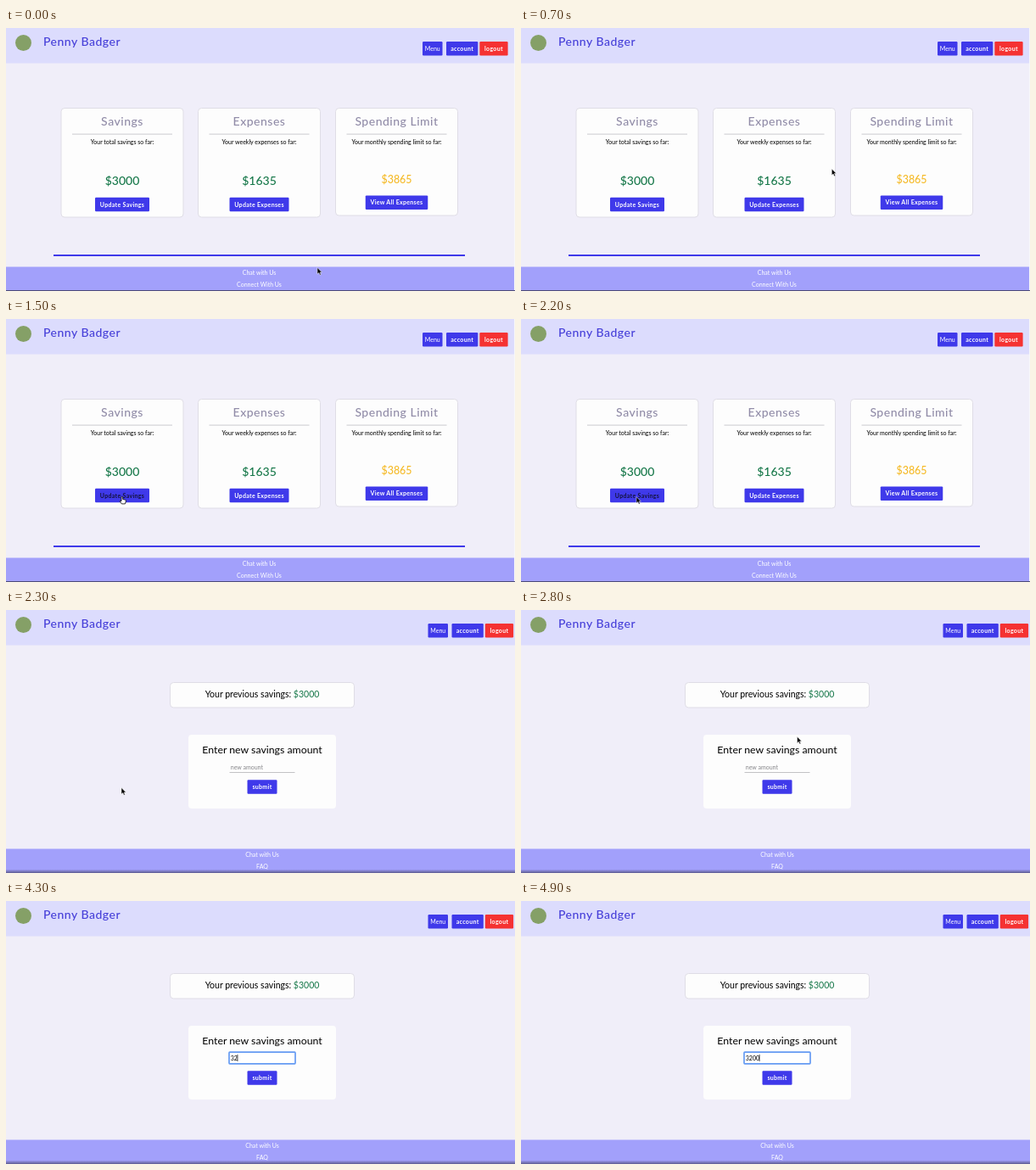
Animation of 600x310 px, one loop 5 s. Source, as an HTML page:

```html
<!DOCTYPE html>
<html lang="en">
<head>
<meta charset="utf-8">
<title>Savings update</title>
<style>
  html, body { margin: 0; width: 100%; height: 100%; overflow: hidden; background: #f0eef9; }
  svg { display: block; width: 600px; height: 310px; font: 7px Lato, sans-serif; }
  .head { font-size: 14px; font-weight: 500; letter-spacing: .5px; }
  .btn { font-weight: 700; letter-spacing: .32px; fill: #fff; }
  .card { fill: #fdfdfd; stroke: #dfdde6; }
</style>
</head>
<body>
<svg viewBox="0 0 600 310">
  <defs>
    <linearGradient id="shade" x2="0" y2="1">
      <stop offset="0" stop-color="#a2a0fb"/>
      <stop offset="1" stop-color="#5c5b90"/>
    </linearGradient>
  </defs>
  <rect width="600" height="310" fill="#f0eef9"/>
  <rect width="600" height="41.5" fill="#dcdcfd"/>
  <circle cx="20.5" cy="17.5" r="9.5" fill="#85a067"/>
  <text class="head" x="44" y="20.5" fill="#463fd9">Penny Badger</text>
  <rect y="281.5" width="600" height="28.5" fill="#a2a0fb"/>
  <g id="nav"></g>
  <g id="home"></g>
  <g id="form"></g>
  <g id="pointer">
    <path id="arrow" d="M0 0V7.6L1.8 6 3 8.7 4.3 8.1 3.1 5.5H5.4Z" fill="#000" stroke="#fff" stroke-width=".5"/>
    <path id="hand" d="M0 0Q1-.9 1.7 0V3L4.7 3.6Q5.6 4 5.3 5.6L4.4 8.4H.4L-1.9 5.2Q-1.6 4.2 0 5.2Z" fill="#fff" stroke="#000" stroke-width=".8"/>
    <path id="beam" d="M-1.3-3.8Q0-3.8 0-2.8Q0-3.8 1.3-3.8M0-2.8V3M-1.3 4Q0 4 0 3Q0 4 1.3 4" fill="none" stroke="#222" stroke-width=".9"/>
  </g>
</svg>
<script>
const $ = id => document.getElementById(id);
const BLUE = '#3f39ea', GREEN = '#17784a';

const text = (s, x, y, attrs = '') =>
  `<text x="${x}" y="${y}" text-anchor="middle" ${attrs}>${s}</text>`;
const box = (x, y, w, h, attrs) =>
  `<rect x="${x}" y="${y}" width="${w}" height="${h}" ${attrs}/>`;
const button = (s, x, y, w, fill = BLUE, attrs = 'class="btn"') =>
  box(x, y, w, 16.5, `rx="1.2" fill="${fill}"`) + text(s, x + w / 2, y + 10.8, attrs);
const footer = (x, last) =>
  text('Chat with Us', x, 291, 'fill="#fff"') + text(last, x, 305, 'fill="#fff"');

function card(x, h, title, label, amount, size, color, action, btnW, btnY, id) {
  const mid = x + 72;
  return box(x, 94.5, 144, h, 'rx="4" class="card"') +
    text(title, mid, 115, 'class="head" fill="#918ca8"') +
    box(x + 13, 124.6, 118, 1, 'fill="#cbcad0"') +
    text(label, mid, 136.8) +
    text(amount, mid, 179.5 + size * .36 - (size < 14 ? 1 : 0), `font-size="${size}" font-weight="500" fill="${color}"`) +
    button(action, mid - btnW / 2, btnY, btnW, BLUE, `class="btn" id="${id}"`);
}

$('nav').innerHTML =
  button('Menu', 491, 16, 23.5, BLUE, 'fill="#fff"') +
  button('account', 519, 16, 37.3) +
  button('logout', 558.3, 16, 33.3, '#f53232');

$('home').innerHTML =
  card(65, 128.5, 'Savings', 'Your total savings so far:', '$3000', 14, GREEN, 'Update Savings', 64, 199.8, 'update') +
  card(226.5, 128.5, 'Expenses', 'Your weekly expenses so far:', '$1635', 14, GREEN, 'Update Expenses', 70, 199.8, 'expenses') +
  card(388.5, 126.5, 'Spending Limit', 'Your monthly spending limit so far:', '$3865', 12.4, '#f5ba27', 'View All Expenses', 73.5, 197.4, 'all') +
  box(56, 267, 485, 2, `fill="${BLUE}"`) +
  footer(298.5, 'Connect With Us') +
  box(0, 309, 600, 1, 'fill="#4c4a78"') +
  box(599, 0, 1, 309, 'fill="#f7f7fa"');

$('form').innerHTML =
  box(193.5, 85.5, 217, 29.5, 'rx="4" class="card"') +
  text(`Your previous savings: <tspan fill="${GREEN}">$3000</tspan>`, 302, 102.7, 'font-size="10.5"') +
  box(215, 147, 174, 87, 'rx="4" fill="#fdfdfd"') +
  text('Enter new savings amount', 302, 168.5, 'font-size="12.3"') +
  box(263.5, 191, 77, .8, 'fill="#b5b5b8"') +
  box(263, 178.2, 78, 13.6, 'id="ring" rx=".8" fill="#fff" stroke="#659bf3" stroke-width="1.7"') +
  '<text id="entry" x="264.8" y="187.6"></text>' +
  box(0, 181, .8, 8, 'id="caret" fill="#111"') +
  button('submit', 284.5, 200.2, 35) +
  footer(302, 'FAQ') +
  box(0, 305.5, 600, 4.5, 'fill="url(#shade)"');

// Pointer stops: time, x, y
const stops = [[0, 367, 282.5], [200, 367, 282.5], [700, 366.3, 166], [800, 366.3, 166],
  [1400, 136, 209.5], [2300, 136, 209.5], [2800, 325.5, 149.3], [2900, 325.5, 149.3], [3300, 286, 188]];
const LOAD = 2300, FOCUS = 3500, TYPE = 4100, KEY = 200;

function pointerAt(t) {
  const i = stops.findIndex(s => s[0] > t);
  if (i < 0) return stops.at(-1).slice(1);
  const [t0, x0, y0] = stops[i - 1], [t1, x1, y1] = stops[i];
  const p = (t - t0) / (t1 - t0), e = p * p * (3 - 2 * p);
  return [x0 + (x1 - x0) * e, y0 + (y1 - y0) * e];
}

const show = (id, on) => $(id).style.display = on ? '' : 'none';

function draw(t) {
  const loaded = t >= LOAD, focused = t >= FOCUS, typing = t >= TYPE;
  const [x, y] = pointerAt(t);
  const over = !loaded && x > 105 && x < 169 && y > 200 && y < 216;
  const inField = loaded && x > 263 && x < 341 && y > 178 && y < 192;

  show('home', !loaded);
  show('form', loaded);
  $('nav').setAttribute('transform', `translate(${loaded ? 6.5 : 0} 0)`);
  $('update').style.fill = over ? '#15133f' : '';

  const typed = typing ? '3200'.slice(0, 1 + Math.floor((t - TYPE) / KEY)) : '';
  $('entry').textContent = typed || 'new amount';
  $('entry').setAttribute('fill', typed ? '#000' : '#86868a');
  show('ring', focused);
  show('caret', focused && (typing || t < FOCUS + 500));
  $('caret').setAttribute('x', 264.4 + typed.length * 4.06);

  const hand = over && t < 2100;
  $('pointer').setAttribute('transform', `translate(${x} ${y})`);
  show('pointer', !typing);
  show('hand', hand);
  show('beam', inField);
  show('arrow', !hand && !inField);
}

const start = performance.now();
function tick() {
  const t = (performance.now() - start) % 5000;
  draw(Math.floor(t / 100) * 100);
  requestAnimationFrame(tick);
}
tick();
</script>
</body>
</html>
```
